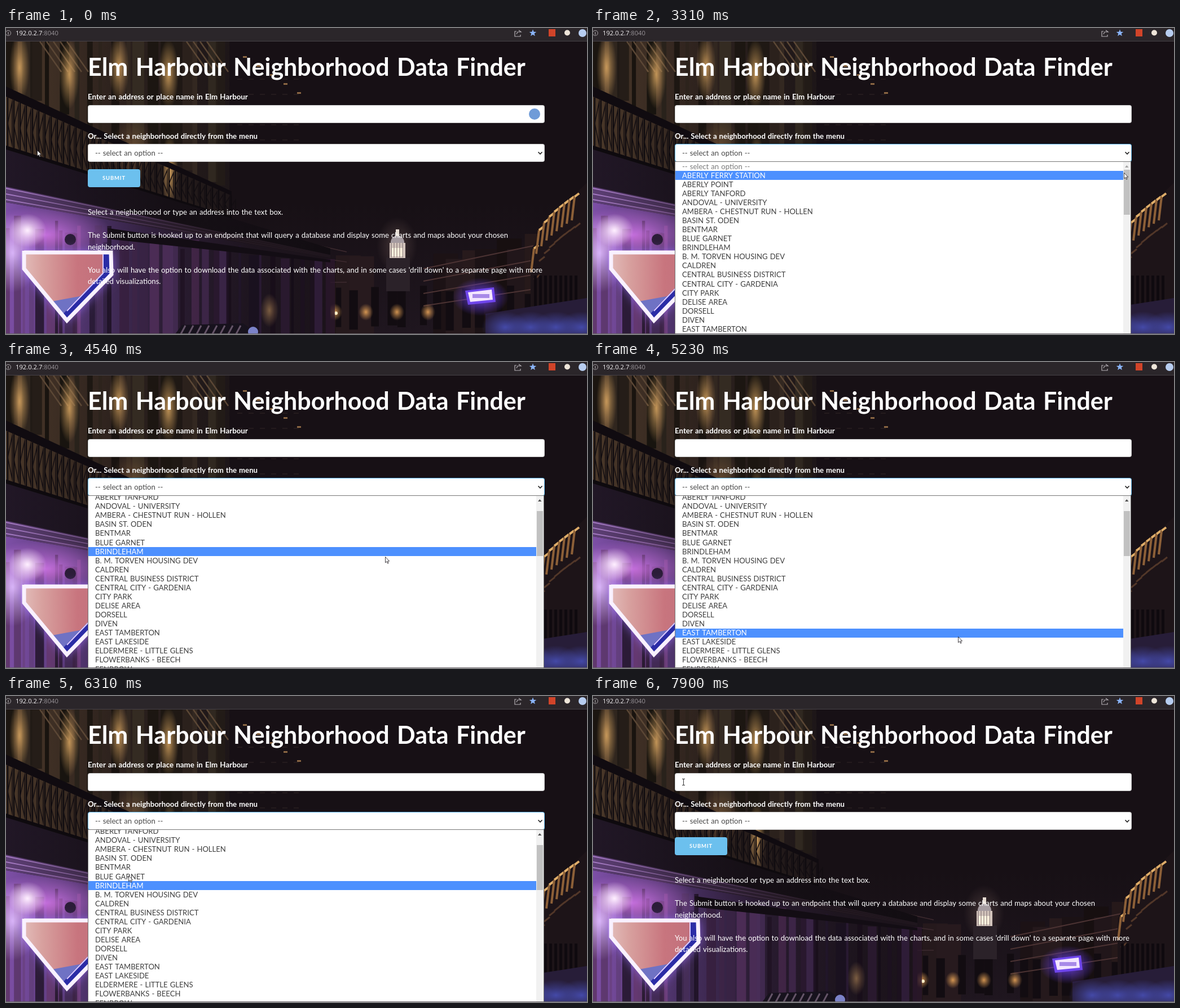
Animation, 1030 px wide and 544 px high, one loop 8000 ms. Source, as an HTML page with a canvas:

```html
<!DOCTYPE html>
<html lang="en">
<head>
<meta charset="utf-8">
<title>Neighborhood data</title>
<style>
html, body { margin: 0; width: 100%; height: 100%; overflow: hidden; background: #171015; }
canvas { display: block; }
</style>
</head>
<body>
<canvas id="stage" width="1030" height="544"></canvas>
<script>
const W = 1030, H = 544, LOOP = 8000, TICK = 136;
const ROW = 16.07, LIST_TOP = 238, SCROLL = 53.6, BODY = 13.1;
const OPEN = 20, SCROLL_AT = 27, CLOSE = 51;
const PROMPT = '-- select an option --';

const options = [
  PROMPT, 'ABERLY FERRY STATION', 'ABERLY POINT', 'ABERLY TANFORD',
  'ANDOVAL - UNIVERSITY', 'AMBERA - CHESTNUT RUN - HOLLEN', 'BASIN ST. ODEN',
  'BENTMAR', 'BLUE GARNET', 'BRINDLEHAM', 'B. M. TORVEN HOUSING DEV', 'CALDREN',
  'CENTRAL BUSINESS DISTRICT', 'CENTRAL CITY - GARDENIA', 'CITY PARK',
  'DELISE AREA', 'DORSELL', 'DIVEN', 'EAST TAMBERTON', 'EAST LAKESIDE',
  'ELDERMERE - LITTLE GLENS', 'FLOWERBANKS - BEECH', 'FENBROW'
];

// Turning points of the pointer: tick, x, y
const path = [
  [0, 55, 217], [8, 389, 53], [15, 976, 115], [16, 965, 178], [24, 941, 257],
  [28, 944, 272], [33, 672, 346], [37, 649, 476], [39, 645, 500],
  [43, 425, 365], [46, 217, 319], [51, 88, 305], [54, 82, 262], [58, 157, 147]
];

let c, seed = 7;
const rnd = () => (seed = seed * 16807 % 2147483647) / 2147483647;

function trace(p) {
  c.beginPath();
  for (let i = 0; i < p.length; i += 2) c.lineTo(p[i], p[i + 1]);
}
function poly(color, ...p) {
  c.fillStyle = color;
  trace(p);
  c.closePath();
  c.fill();
}
function line(color, width, ...p) {
  c.strokeStyle = color;
  c.lineWidth = width;
  trace(p);
  c.stroke();
}
function rect(color, x, y, w, h, r = 0) {
  c.fillStyle = color;
  c.beginPath();
  c.roundRect(x, y, w, h, r);
  c.fill();
}
function disc(color, x, y, r) {
  c.fillStyle = color;
  c.beginPath();
  c.arc(x, y, r, 0, 7);
  c.fill();
}
function glow(rgb, alpha, x, y, rx, ry) {
  c.save();
  c.translate(x, y);
  c.scale(rx, ry);
  const g = c.createRadialGradient(0, 0, 0, 0, 0, 1);
  g.addColorStop(0, `rgba(${rgb},${alpha})`);
  g.addColorStop(0.45, `rgba(${rgb},${alpha * 0.5})`);
  g.addColorStop(1, `rgba(${rgb},0)`);
  c.fillStyle = g;
  c.fillRect(-1, -1, 2, 2);
  c.restore();
}
function across(width, ...colors) {
  const g = c.createLinearGradient(0, 0, width, 0);
  colors.forEach((color, i) => g.addColorStop(i / (colors.length - 1), color));
  return g;
}
function text(str, x, y, size, color, weight = 400, gap = 0.7, font = 'Lato, "Open Sans", sans-serif') {
  c.font = `${weight} ${size}px ${font}`;
  c.wordSpacing = gap + 'px';
  c.fillStyle = color;
  c.fillText(str, x, y);
}

// Height at x of a facade edge that leaves the left side at y0 and runs down the street
const ray = (y0, x) => y0 + (430 - y0) * x / 700;
function band(color, y0, y1, x0, x1) {
  poly(color, x0, ray(y0, x0), x1, ray(y0, x1), x1, ray(y1, x1), x0, ray(y1, x0));
}

function upperFloors() {
  band(across(400, '#4a3829', '#2c211d', '#1d1618'), -620, 215, 0, 396);
  for (let x = 0; x < 390; x += 10 + rnd() * 18) {
    const w = 5 + rnd() * 18;
    rect(`hsla(${20 + rnd() * 15},22%,${5 + rnd() * 13}%,0.8)`, x, 24, w, ray(110, x) - 24);
  }
  for (let i = 0; i < 9; i++) {
    const x = 60 + i * 12 + (i > 4 ? 200 : 0);
    line('#5b4735', 2.5, x, 24, x + 38, 78);
  }
  for (let i = 0; i < 4; i++) glow('220,168,98', 0.85, 24 + i * 88, 70 + i % 2 * 12, 18, 62);
  glow('228,174,100', 0.9, 290, 255, 15, 66);
  glow('150,106,66', 0.5, 225, 215, 38, 60);
}

function railing() {
  band('#100b10', 104, 122, 0, 400);
  for (let x = 3; x < 400; x += 11) {
    const top = ray(122, x), foot = ray(215, x), mid = (top + foot) / 2;
    line('#0f0b0f', 2.4, x, top, x, foot);
    line('#130e12', 1.5, x, mid, x + 8, top + 8, x + 8, foot - 8, x, mid);
  }
  band('#0e0a0e', 209, 217, 0, 400);
}

function lowerFloor() {
  band(across(575, '#211726', '#150f15', '#120d12'), 216, 282, 0, 575);
  band(across(575, '#5d3f75', '#33233b', '#20161d', '#1d141b'), 282, 310, 0, 575);
  for (let i = 0; i < 3; i++)
    band(across(400, '#a77cc6', '#5d4269', '#2a1e2a'), 284 + i * 10, 286 + i * 10, 0, 575);
  band(across(575, '#7d4fa6', '#4c3268', '#2a1c32', '#1e151f', '#1b131a'), 310, 1200, 0, 575);
  for (let x = 0; x < 570; x += 7 + rnd() * 16) {
    const top = ray(325 + rnd() * 40, x), near = Math.exp(-x / 260);
    rect(`hsla(${270 + rnd() * 25},32%,${5 + rnd() * (13 + 34 * near)}%,0.75)`, x, top, 4 + rnd() * 15, H - top);
  }
  band('#130d14', 330, 356, 180, 575);
  glow('205,115,228', 0.9, 70, 368, 120, 52);
  glow('225,190,255', 0.9, 12, 400, 46, 70);
  glow('255,240,255', 1, 38, 360, 34, 30);
  disc('#2b1c38', 114, 376, 10);
  glow('216,165,102', 0.5, 467, 502, 16, 30);
  // Awning and lamp over the pavement
  poly('#17121d', 312, 528, 420, 525, 447, 544, 300, 544);
  for (let x = 318; x < 420; x += 14) line('#655468', 3, x, 529, x - 8, 544);
  disc('#7b82c8', 438, 540, 9);
}

function farStreet() {
  for (let x = 436; x < 950; x += 16 + rnd() * 26) {
    const top = 395 + rnd() * 25 - Math.max(0, x - 740) * 0.18;
    if (x < 640 || x > 735) rect(`hsl(${335 + rnd() * 20},20%,${7 + rnd() * 6}%)`, x, top, 44, H - top);
    rect('#120c11', x, 455 + rnd() * 20, 8 + rnd() * 10, 70);
  }
  for (let i = 0; i < 4; i++) {
    line('#3d2a2f', 1.5, 462, 366 + i * 29, 604, 398 + i * 18);
    line('#4c3333', 2, 740, 428 + i * 22, 950, 384 + i * 26);
  }
  for (let x = 583; x < 760; x += 55) glow('255,180,95', 0.8, x, 505, 13, 15);
  disc('#fff0c8', 585, 507, 3);
}

function dome() {
  glow('160,130,120', 0.35, 693, 386, 36, 50);
  rect('#2b2229', 674, 408, 42, 60);
  disc('#a59ba0', 694, 381, 12);
  rect('#d3c4bc', 680, 382, 28, 27);
  rect('#e6dcd3', 691, 358, 6, 12);
  rect('#fff4e0', 684, 391, 20, 15);
  for (let x = 683; x < 707; x += 5) line('#786a6d', 1, x, 382, x, 408);
}

function rightFacade() {
  poly('#1d1418', 930, 396, 958, 345, 1030, 275, 1030, 544, 930, 544);
  for (let i = 0; i < 9; i++) {
    const x = 936 + i * 9, y = 392 - 92 * Math.sqrt(i / 8);
    line('#8d6038', 4, x, y, x - 5, y + 42);
    line('#e0ae6a', 4, x, y, x + 8, y - 6);
    line('#523729', 3, x, y + 55, x + 10, y + 47);
    rect('#0f0a0f', x, 440, 5, 55);
  }
  poly('#271d38', 850, 508, 1030, 480, 1030, 544, 850, 544);
  for (let x = 885; x < 1030; x += 45) glow('78,88,205', 0.75, x, 532, 42, 28);
}

function signs() {
  glow('111,66,238', 1, 841, 478, 50, 34);
  poly('#6f46ec', 814, 467, 865, 461, 868, 487, 819, 492);
  poly('#f3e6ff', 819, 470, 861, 465, 863, 483, 823, 487);
  rect('#a88ae8', 827, 473, 30, 7);

  const edge = [32, 399, 186, 399, 187, 438, 108, 520, 32, 428, 32, 396];
  c.save();
  c.shadowColor = '#9a70ff';
  c.shadowBlur = 20;
  poly('#5446c5', ...edge);
  c.restore();
  c.save();
  trace(edge);
  c.clip();
  rect(across(190, '#ecd6d2', '#d8a19f', '#c8757e', '#bf6f7c'), 30, 396, 160, 92);
  poly('#6f72c4', 60, 490, 190, 466, 190, 530, 60, 530);
  line('#2b2ca6', 22, 182, 396, 182, 440, 108, 517);
  c.restore();
  line('#f9f1ff', 7, ...edge);
  line('#ddccff', 2, 172, 402, 172, 436, 108, 503);
}

function scenery() {
  const sky = c.createLinearGradient(0, 24, 0, H);
  sky.addColorStop(0, '#171015');
  sky.addColorStop(0.55, '#171015');
  sky.addColorStop(1, '#1f161f');
  c.fillStyle = sky;
  c.fillRect(0, 0, W, H);
  for (let i = 0; i < 30; i++)
    rect('#241b1d', 410 + i % 6 * 20, 90 + Math.floor(i / 6) * 27, 9, 2);
  for (let i = 0; i < 5; i++) rect('#8b6743', 420 + i * 24, 50 + i * 16, 7, 3);
  farStreet();
  dome();
  rightFacade();
  upperFloors();
  railing();
  lowerFloor();
  signs();
}

function toolbar() {
  rect('#2b262a', 0, 0, W, 24);
  rect('#464146', 0, 23, W, 1);
  disc('#a6a2a6', 4, 9, 5);
  disc('#2b262a', 4, 9, 4);
  rect('#a6a2a6', 3.4, 7, 1.2, 5);
  const font = '"Open Sans", sans-serif';
  text('192.0.2.7', 17, 13, 11.2, '#f4f2f4', 400, 0, font);
  text(':8040', 17 + c.measureText('192.0.2.7').width, 13, 11.2, '#979297', 400, 0, font);
  line('#b5b0b5', 1.2, 905, 6, 902, 6, 902, 15, 912, 15, 912, 12);
  line('#b5b0b5', 1.2, 905, 11, 907, 7, 913, 7, 909, 4);
  const star = [];
  for (let i = 0; i < 10; i++) {
    const a = i * Math.PI / 5 - Math.PI / 2, r = i % 2 ? 2.8 : 6.6;
    star.push(934 + r * Math.cos(a), 9 + r * Math.sin(a));
  }
  poly('#8ab4f8', ...star);
  rect('#d14429', 962, 2, 12, 13);
  disc('#eee5d9', 995, 8.5, 5);
  disc('#b7cdf0', 1022, 9, 7);
}

function page() {
  scenery();
  toolbar();
  text('Elm Harbour Neighborhood Data Finder', 145, 85, 43, '#fff', 700, 3);
  text('Enter an address or place name in Elm Harbour', 145, 127, 13.3, '#fff', 700, 1);
  text('Or... Select a neighborhood directly from the menu', 145, 196.5, 13.2, '#fff', 700);
  field(137, '#c9c9c9');
  rect('#6cc0ee', 145, 251, 93, 32, 4);
  c.letterSpacing = '0.9px';
  text('SUBMIT', 171, 270, 9.4, '#fff', 700, 0);
  c.letterSpacing = '0px';
  [
    'Select a neighborhood or type an address into the text box.',
    '',
    'The Submit button is hooked up to an endpoint that will query a database and display some charts and maps about your chosen',
    'neighborhood.',
    '',
    "You also will have the option to download the data associated with the charts, and in some cases 'drill down' to a separate page with more",
    'detailed visualizations.'
  ].forEach((s, i) => text(s, 145, 332 + i * 20.5, BODY, '#fff'));
  rect('#6b676b', 0, 543, W, 1);
}

function field(y, border) {
  rect(border, 145, y, 810, 32, 4);
  rect('#fff', 146, y + 1, 808, 30, 3);
}

function at(n) {
  const i = Math.max(1, path.findIndex(p => p[0] >= n));
  const [n0, x0, y0] = path[i - 1], [n1, x1, y1] = path[i];
  const k = (n - n0) / (n1 - n0);
  return [Math.round(x0 + (x1 - x0) * k), Math.round(y0 + (y1 - y0) * k)];
}

function dropdown(n) {
  const scroll = SCROLL * Math.min(1, Math.max(0, (n - SCROLL_AT + 1) / 2));
  // The highlight trails the pointer by one tick.
  const [hx, hy] = at(Math.min(n - 1, 47));
  const active = hx > 940 ? 1 : Math.floor((hy - LIST_TOP + scroll) / ROW);
  c.save();
  c.beginPath();
  c.rect(145, 237, 809, 306);
  c.clip();
  rect('#767676', 145, 237, 809, 310);
  rect('#fff', 146, LIST_TOP, 807, 310);
  c.beginPath();
  c.rect(146, LIST_TOP, 794, 306);
  c.clip();
  options.forEach((name, i) => {
    const y = LIST_TOP + i * ROW - scroll;
    if (i === active) rect('#4d90fe', 146, Math.round(y), 794, 16);
    text(name, 158, y + 12.6, BODY, i === active ? '#fff' : i ? '#3f3f3f' : '#7b7b7b');
  });
  c.restore();
  rect('#f1f1f1', 940, LIST_TOP, 13, 305);
  poly(scroll ? '#505050' : '#a3a3a3', 943, 248, 949.5, 248, 946.2, 244);
  const dragged = n >= 25 && n <= SCROLL_AT;
  rect(dragged ? '#787878' : '#c1c1c1', 941, 252 + Math.round(13 * scroll / SCROLL), 11, 80);
}

function pointer(n) {
  const [x, y] = at(n);
  c.save();
  c.translate(x, y);
  if (x > 145 && x < 955 && y > 136 && y < 163) {
    rect('#333', 3, 1, 1, 10);
    for (const end of [0, 11]) rect('#333', 1, end, 5, 1);
  } else {
    const arrow = [0.5, 0.5, 0.5, 10.8, 2.9, 8.6, 4.6, 12.2, 6.1, 11.5, 4.5, 8, 7.6, 8];
    poly('#fff', ...arrow);
    line('#18151a', 0.8, ...arrow, 0.5, 0.5);
  }
  c.restore();
}

const view = document.getElementById('stage').getContext('2d');
const backdrop = document.createElement('canvas');
backdrop.width = W;
backdrop.height = H;
c = backdrop.getContext('2d');
page();
c = view;

function draw(time) {
  const n = Math.floor((time % LOOP + 13) / TICK);
  const open = n >= OPEN && n < CLOSE;
  c.drawImage(backdrop, 0, 0);
  if (n < 17) disc('#6f9bd8', 937, 153, 10);
  field(206, open ? '#62b9ec' : '#c9c9c9');
  text(PROMPT, 158, 227, BODY, '#484848');
  line('#222', 1.7, 943.5, 220.5, 947, 224, 950.5, 220.5);
  if (open) dropdown(n);
  pointer(n);
}

const start = performance.now();
function frame() {
  draw(performance.now() - start);
  requestAnimationFrame(frame);
}
frame();
</script>
</body>
</html>
```
